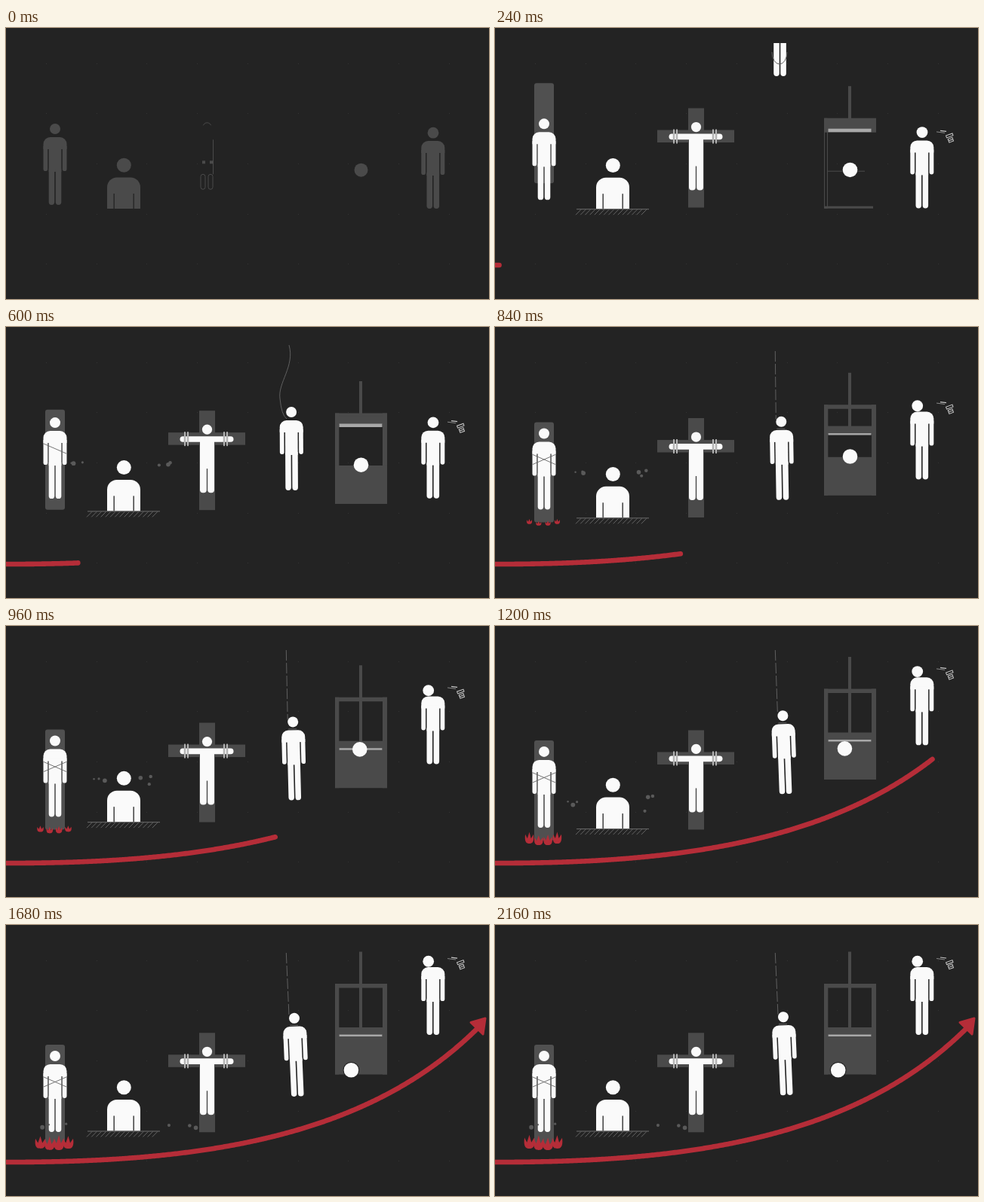
These frames come from a looping animation (640 by 360 pixels, 2.28 s). An HTML page with a canvas:

```html
<!DOCTYPE html>
<html lang="en">
<head>
<meta charset="utf-8">
<title>Rising curve</title>
<style>
html, body { margin: 0; width: 100%; height: 100%; overflow: hidden; background: #232323; }
canvas { display: block; width: 640px; height: 360px; }
</style>
</head>
<body>
<canvas id="stage" width="640" height="360"></canvas>
<script>
const ctx = document.getElementById('stage').getContext('2d');
const BG = '#232323', GREY = '#4a4a4a', RED = '#b52d38', WHITE = '#fafafa';
const STEP = 120, COUNT = 19;

const clamp = v => Math.min(1, Math.max(0, v));

function easeInOut(t, power) {
  t = clamp(t);
  return t < 0.5 ? (2 * t) ** power / 2 : 1 - (2 - 2 * t) ** power / 2;
}

// Shared vertical drift of all figures, 0 to 1
const drift = k => easeInOut(k / 15, 3.3);

function seeded(n) {
  const v = Math.sin(n * 127.1 + 3.7) * 43758.5453;
  return v - Math.floor(v);
}

function rect(x, y, w, h, color) {
  ctx.fillStyle = color;
  ctx.fillRect(x, y, w, h);
}

function round(x, y, w, h, r, color) {
  ctx.fillStyle = color;
  ctx.beginPath();
  ctx.roundRect(x, y, w, h, r);
  ctx.fill();
}

function disc(x, y, r, color) {
  ctx.fillStyle = color;
  ctx.beginPath();
  ctx.arc(x, y, r, 0, 7);
  ctx.fill();
}

function line(color, width, x1, y1, x2, y2) {
  ctx.strokeStyle = color;
  ctx.lineWidth = width;
  ctx.beginPath();
  ctx.moveTo(x1, y1);
  ctx.lineTo(x2, y2);
  ctx.stroke();
}

function frame(x, y, w, h, color, r = 0) {
  ctx.strokeStyle = color;
  ctx.lineWidth = 1;
  ctx.beginPath();
  ctx.roundRect(x, y, w, h, r);
  ctx.stroke();
}

function body(x, top, h, color) {
  round(x - 15.5, top, 31, 16, [9, 9, 0, 0], color);
  for (const side of [-15.5, 9.8]) round(x + side, top + 12, 5.7, 33, [0, 0, 3, 3], color);
  rect(x - 8.3, top + 12, 16.6, 34, color);
  for (const side of [-8.3, 0.8]) round(x + side, top + 42, 7.5, h - 42, [0, 0, 3.7, 3.7], color);
}

function grid() {
  for (let x = 53; x < 640; x += 66.7)
    for (let y = 46.5; y < 340; y += 66.7) rect(Math.round(x), Math.round(y), 1, 1, '#343434');
}

// A bowl with three pointed tips
function flame(x, base, w, h) {
  const tip = (dx, rise) => ctx.lineTo(x + dx * w, base - rise * h);
  ctx.fillStyle = RED;
  ctx.beginPath();
  ctx.moveTo(x - w / 2, base - h * 0.8);
  tip(-0.25, 0.45);
  tip(0, 1);
  tip(0.2, 0.45);
  tip(0.5, 0.8);
  ctx.bezierCurveTo(x + w * 0.65, base, x + w * 0.2, base, x, base);
  ctx.bezierCurveTo(x - w * 0.2, base, x - w * 0.65, base, x - w / 2, base - h * 0.8);
  ctx.fill();
}

function stake(k, ink) {
  const head = 120 + 54 * drift(k) + 14 * clamp(1 - k / 4);
  const post = head - 15 - 39 * Math.max(0, (6 - k) / 4) ** 2;
  if (k > 0) round(52, post, 26, 133, 3, '#505050');
  disc(65, head, 7, ink);
  body(65, head + 11, 90, ink);
  if (k >= 5) line('#666', 0.9, 50, head + 28, 80, head + 41);
  if (k >= 7) line('#666', 0.9, 80, head + 28, 50, head + 41);
  const size = clamp((k - 6.5) / 5);
  for (let i = 0; size && i < 4; i++) {
    const sway = 1 + 0.1 * Math.sin(k * 2.1 + i * 2);
    const lower = i % 3 ? 2 : 0;
    flame(64 + (i - 1.5) * 12.3, post + 135 + 3 * size + lower, 6 + 7 * size, (5 + 13 * size) * sway);
  }
}

// Stones close in, bounce at step 8 and come to rest
function stones(k) {
  for (let i = 0; k > 3 && i < 6; i++) {
    const side = i % 2 ? 1 : -1;
    const x = 156 + side * (22 + 22 * seeded(i) + (4 + 10 * seeded(i + 20)) * Math.abs(Math.min(k, 14) - 8));
    const fall = (1.2 + 0.7 * seeded(i + 40)) * (k - 4) ** 2;
    const y = Math.min(168 + 15 * seeded(i + 60) + fall, 264 + 8 * seeded(i + 80));
    disc(x, y, 1.2 + 1.8 * seeded(i + 100), '#5a5a5a');
  }
}

function buried(k, ink) {
  const base = 240 + 33.5 * drift(k);
  disc(156.3, base - 57.8, 9.5, ink);
  round(134, base - 41.5, 44, 41.5, [13, 13, 0, 0], ink);
  for (const x of [142.5, 168.5]) rect(x, base - 20, 1.3, 20, BG);
  if (k > 0) {
    line('#6c6c6c', 1, 108, base + 0.5, 204, base + 0.5);
    for (let x = 114; x < 204; x += 6.2) line('#6c6c6c', 0.9, x, base + 1, x - 7, base + 8);
  }
  stones(k);
}

function cross(k, ink) {
  const y = 131.3 + 37 * drift(k);
  if (k < 1) {
    ctx.strokeStyle = GREY;
    ctx.lineWidth = 1;
    ctx.beginPath();
    ctx.arc(266.5, y, 5.5, 3.5, 5.9);
    ctx.stroke();
    line(GREY, 1, 274.5, y + 17, 274.5, y + 63);
    for (const x of [258, 268]) {
      frame(x, y + 63, 6, 20, GREY, 3);
      rect(x + 2, y + 45, 4, 4, GREY);
    }
    return;
  }
  rect(256, y - 25, 21, 132, GREY);
  rect(215, y + 4, 102, 16.5, GREY);
  disc(266.5, y, 6.6, ink);
  round(230.5, y + 9, 71, 7.7, 3.8, ink);
  rect(257, y + 10, 19, 42, ink);
  for (const x of [257, 267.2]) round(x, y + 48, 8.8, 36, [0, 0, 4, 4], ink);
  for (const x of [237, 241, 289, 293]) {
    rect(x - 1.1, y + 8.5, 2.2, 9, GREY);
    rect(x - 0.6, y + 3, 1.2, 19, ink);
  }
}

function hanged(k, ink) {
  if (k < 1) return;
  const s = k - 5;
  const x = 377.5 + 4.5 * drift(k);
  const y = s < 0 ? 113 - 17 * s * s : 122 - 9 * Math.exp(-s / 6) * Math.cos(s * 1.1);
  ctx.save();
  ctx.beginPath();
  ctx.rect(330, 20, 90, 340);
  ctx.clip();
  ctx.save();
  ctx.translate(x, y);
  ctx.rotate(-0.042 * drift(k));
  disc(0, 0, 7, ink);
  body(0, 11, 93, ink);
  ctx.restore();
  ctx.strokeStyle = '#606060';
  ctx.lineWidth = 1;
  ctx.beginPath();
  if (k < 4) {
    ctx.ellipse(377, 32, 10, 16, 0, 0, Math.PI);
  } else if (k < 7) {
    ctx.moveTo(375, 24);
    ctx.bezierCurveTo(383, 52, 360, 74, 363, y - 18);
    ctx.quadraticCurveTo(365, y + 4, 372, y + 9);
  } else {
    ctx.setLineDash([14, 3]);
    ctx.moveTo(371.3, k < 12 ? 32 : 37);
    ctx.lineTo(x - 7, y - 3);
    ctx.moveTo(x - 6, y + 9.5);
    ctx.lineTo(x + 5, y + 9.5);
  }
  ctx.stroke();
  ctx.restore();
}

function guillotine(k, ink) {
  const top = 120 - 42 * drift(k);
  const blade = top + 4.5 + 53.5 * clamp((k - 5) / 3) ** 2;
  if (k > 0) {
    rect(468, top - 42.5, 4, blade - top + 43, GREY);
    if (k < 3) {
      frame(436.5, top + 0.5, 4, 119, GREY);
      rect(436, top, 69, 19, GREY);
      rect(436, top + 117, 65, 3, GREY);
      rect(441, top + 70, 49, 1, GREY);
    } else {
      rect(436, top, 69, 5.5, GREY);
      rect(436, top, 5.3, 120.5, GREY);
      rect(499, top, 6, 120.5, GREY);
      rect(436, top + 69.5, 69, 51, GREY);
    }
    rect(441, blade, 58, 10, GREY);
    rect(441.5, blade + 9.5, 57, k < 7 ? 4.5 : 2.5, '#a8a8a8');
  }
  const s = Math.max(0, k - 7.5);
  const x = 470.5 - 18 * (1 - Math.exp(-s / 5));
  const y = top + 68.7 + Math.min(46, 1.7 * s * s);
  if (k > 10) disc(x, y, 10.8, BG);
  disc(x, y, k < 1 ? 9 : 9.8, ink);
}

function shot(k, ink) {
  const top = 150 - 94 * drift(k);
  const hit = clamp((k - 5) / 2);
  disc(566 - 6.3 * hit, top - 10.8 + 3 * hit, 7.4, ink);
  body(565.8, top, 90, ink);
  if (k < 1) return;
  const pale = '#c8c8c8';
  ctx.save();
  ctx.translate(603, top - 3);
  line('#888', 1, -18, -8.5, -7, -7);
  line(pale, 1.2, -13, -10, -5, -9);
  ctx.rotate(-0.35);
  frame(-4, -5, 9, 3, pale);
  frame(-3, 0, 6, 5, pale);
  line(pale, 1, -3, 2.5, 3, 2.5);
  ctx.restore();
}

function bezier(t, a, b, c, d) {
  const u = 1 - t;
  return u * u * u * a + 3 * u * u * t * b + 3 * u * t * t * c + t * t * t * d;
}

function curve(k) {
  if (k < 1) return;
  const end = 781 * easeInOut(k / 16.5, 2.8);
  ctx.save();
  ctx.strokeStyle = ctx.fillStyle = RED;
  ctx.lineWidth = 6.6;
  ctx.lineCap = ctx.lineJoin = 'round';
  ctx.beginPath();
  for (let t = 0; t <= 1; t += 0.0025) {
    const x = bezier(t, -10, 250, 478, 628);
    if (x > end) break;
    ctx.lineTo(x, bezier(t, 315, 316, 286, 134));
  }
  ctx.stroke();
  if (end > 628) {
    ctx.lineWidth = 3;
    ctx.beginPath();
    ctx.moveTo(635, 124);
    ctx.lineTo(616, 129.5);
    ctx.lineTo(632, 145);
    ctx.closePath();
    ctx.fill();
    ctx.stroke();
  }
  ctx.restore();
}

function draw(k) {
  const ink = k === 0 ? GREY : k === 1 ? '#a8a8a8' : WHITE;
  rect(0, 0, 640, 360, BG);
  grid();
  for (const part of [stake, buried, cross, hanged, guillotine, shot]) part(k, ink);
  curve(k);
}

const start = performance.now();
function tick() {
  const time = Math.max(0, performance.now() - start);
  draw(Math.floor(time / STEP) % COUNT);
  requestAnimationFrame(tick);
}
tick();
</script>
</body>
</html>
```
